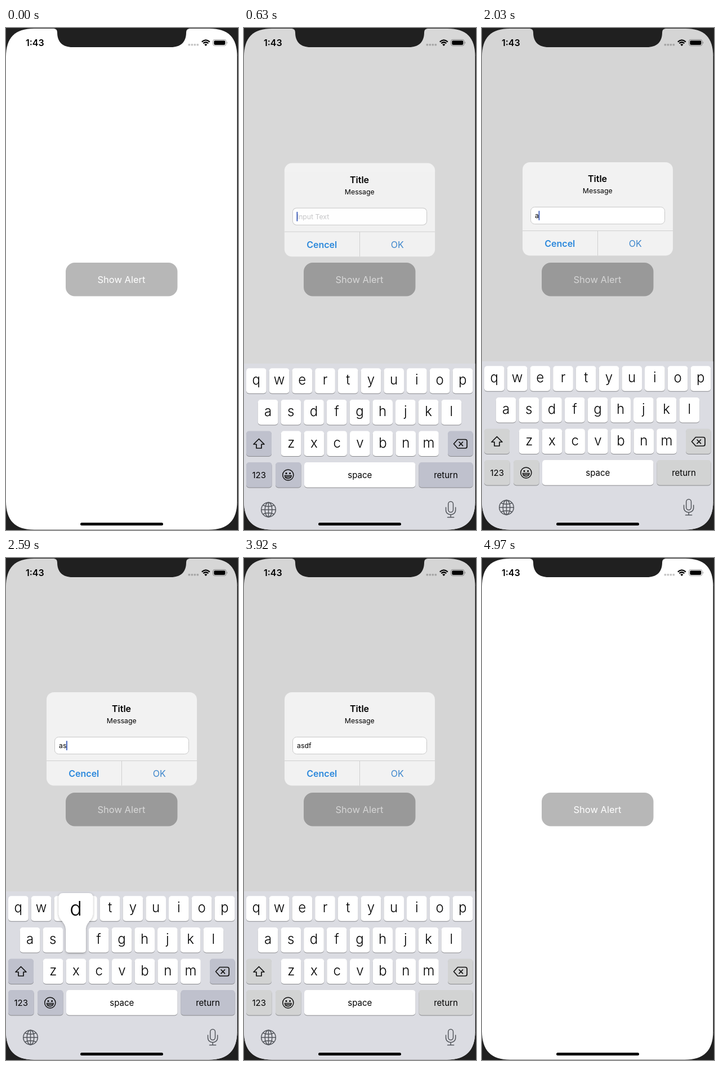
An HTML page that plays this animation: 412 px wide and 890 px high, repeating every 5.46 s.

```html
<!DOCTYPE html>
<html lang="en">
<head>
<meta charset="utf-8">
<title>Alert with text field</title>
<style>
  html, body { margin: 0; width: 100%; height: 100%; overflow: hidden; background: #202020; }
  svg { display: block; width: 412px; height: 890px; }
  text { font-family: Inter, Roboto, sans-serif; }
  .mid { text-anchor: middle; }
  .letter { font-size: 24px; font-weight: 300; }
  .word { font-size: 15px; }
  .bold { font-size: 16px; font-weight: 600; }
  .line { fill: none; stroke: #111; stroke-width: 1.7; stroke-linejoin: round; stroke-linecap: round; }
  .thin { fill: none; stroke: #53565c; stroke-width: 1.5; stroke-linecap: round; }
  #board { --dark: #bfc1cd; }
  #board.grey { --dark: #d2d3d3; }
  .dark { fill: var(--dark); }
</style>
</head>
<body>
<svg viewBox="0 0 412 890">
  <defs>
    <clipPath id="screen">
      <path d="M0 51C0 17 16 1 50 1H361C395 1 410.500 17 410.500 51V839C410.500 873 394 889.500 360 889.500H50C16 889.500 0 873 0 839Z"/>
    </clipPath>
    <filter id="soft" x="-30%" y="-20%" width="160%" height="140%">
      <feDropShadow dx="0" dy="1" stdDeviation="2" flood-opacity=".3"/>
    </filter>
  </defs>
  <rect width="412" height="890" fill="#202020"/>
  <rect x="410.500" y="50" width="1.500" height="790" fill="#080808"/>
  <g clip-path="url(#screen)">
    <rect width="412" height="890" fill="#fff"/>
    <rect x="106" y="416" width="198.500" height="59.500" rx="16" fill="#b7b7b7"/>
    <text class="mid" x="205" y="452" font-size="16.500" fill="#fff">Show Alert</text>
    <rect id="dim" width="412" height="890"/>

    <g id="alert">
      <rect x="72" y="238" width="267" height="165.500" rx="13" fill="#f2f2f2"/>
      <path id="press" d="M206 360H339V390.500A13 13 0 0 1 326 403.500H206Z" fill="#e2e2e2"/>
      <text class="mid bold" x="205" y="273">Title</text>
      <text class="mid" x="205.300" y="293" font-size="12.300">Message</text>
      <rect id="field" x="86.500" y="317.500" width="238" height="30" rx="7" stroke="#c8c8c8"/>
      <text id="hint" x="94" y="337" font-size="12.200" fill="#c6c6c8">Input Text</text>
      <text id="typed" x="94" y="337" font-size="12.300"></text>
      <rect id="caret" y="324" width="2" height="17" rx="1" fill="#4a68c0"/>
      <path d="M72 359.500H339M205.500 360V403.500" stroke="#d0d0d0"/>
      <text class="mid bold" x="138.300" y="388" fill="#2b88dc">Cencel</text>
      <text class="mid" x="272.300" y="388" font-size="16" fill="#3d86cc">OK</text>
    </g>

    <g id="board">
      <rect y="591" width="412" height="300" fill="#dbdce2"/>
      <g id="keys"></g>
      <path class="line" d="M26.500 724.500L36 734H31V741H22V734H17Z"/>
      <path class="line" d="M379.500 725.500H393Q396 725.500 396 728.500V738Q396 741 393 741H379.500L372.500 733.200ZM382 730L388.500 736.600M388.500 730L382 736.600"/>
      <circle class="line" cx="78.300" cy="788.500" r="9.600" style="stroke-width:1.500"/>
      <circle cx="75" cy="785.500" r="1.500"/><circle cx="81.600" cy="785.500" r="1.500"/>
      <path class="line" d="M72.300 789.500H84.300C83.500 796.500 73 796.500 72.300 789.500ZM74 792H82.600" style="stroke-width:1.300"/>
      <g class="thin">
        <circle cx="43.500" cy="850" r="12.800"/>
        <ellipse cx="43.500" cy="850" rx="6.300" ry="12.800"/>
        <path d="M43.500 837V863M30.700 850H56.300M33.500 842Q43.500 846.500 53.500 842M33.500 858Q43.500 853.500 53.500 858"/>
        <rect x="362.700" y="835.500" width="8.800" height="19" rx="4.400"/>
        <path d="M358.500 846V850.500C358.500 861.500 375.700 861.500 375.700 850.500V846M367.100 859V863.500M361.500 863.500H372.700"/>
      </g>
      <g id="popup">
        <path filter="url(#soft)" fill="#fff" d="M-22.500 -61H22.500Q30.500 -61 30.500 -53V-26C30.500 -12 17.800 -10 17.800 4V39.500Q17.800 44.500 12.800 44.500H-12.800Q-17.800 44.500 -17.800 39.500V4C-17.800 -10 -30.500 -12 -30.500 -26V-53Q-30.500 -61 -22.500 -61Z"/>
        <text id="big" class="mid" y="-21" font-size="36" font-weight="300"></text>
      </g>
    </g>
    <rect x="132" y="877" width="147" height="5" rx="2.500"/>
  </g>

  <path fill="#202020" d="M85 0V1Q91 1.500 91 8C91 25 101 34 118 34H293C310 34 320 25 320 8Q320 1.500 326 1V0Z"/>
  <text class="bold" x="35" y="32">1:43</text>
  <g opacity=".22">
    <rect x="323.500" y="28" width="3.600" height="3.600" rx="1"/>
    <rect x="328.500" y="28" width="3.600" height="3.600" rx="1"/>
    <rect x="333.500" y="28" width="3.600" height="3.600" rx="1"/>
    <rect x="338.500" y="28" width="3.600" height="3.600" rx="1"/>
  </g>
  <path d="M347.800 24.600Q354.800 18 361.800 24.600M350.300 27.300Q354.800 23.200 359.300 27.300" fill="none" stroke="#000" stroke-width="2.200"/>
  <path d="M352.200 29.200Q354.800 27.200 357.400 29.200L354.800 32Z"/>
  <rect x="367.500" y="20.500" width="23.500" height="11" rx="3.300" fill="none" stroke="#000" stroke-opacity=".38"/>
  <rect x="369.300" y="22.200" width="20" height="7.700" rx="1.800"/>
  <path d="M392.200 24Q394.200 26 392.200 28Z" opacity=".45"/>
</svg>
<script>
  const LOOP = 5460, STEP = 70, SHOW = 330, HIDE = 4376;
  const PITCH = 40.72, KEY_W = 35.7, KEY_H = 44.500;
  const el = id => document.getElementById(id);
  const set = (id, attrs) => { for (const k in attrs) el(id).setAttribute(k, attrs[k]); };
  const within = (t, [a, b]) => t >= a && t < b;

  // Keyboard
  const centers = {};
  let markup = "";
  function key(x, y, w, label, type, dark) {
    const box = `x="${x}" width="${w}" height="${KEY_H}" rx="5"`;
    markup += `<rect ${box} y="${y + 1}" fill="#898a8e"/>` +
      `<rect ${box} y="${y}" ${dark ? 'class="dark"' : 'fill="#fff"'}/>` +
      `<text class="mid ${type}" x="${x + w / 2}" y="${y + (type === "word" ? 27.500 : 29)}">${label}</text>`;
  }
  [["qwertyuiop", 4, 599.300], ["asdfghjkl", 24.700, 655], ["zxcvbnm", 65.800, 710.500]].forEach(([row, x0, y]) =>
    [...row].forEach((c, i) => {
      const x = x0 + i * PITCH;
      centers[c] = x + KEY_W / 2;
      key(x, y, KEY_W, c, "letter");
    }));
  key(4, 710.500, 45, "", "word", true);
  key(362, 710.500, 44.500, "", "word", true);
  key(4, 766, 45.500, "123", "word", true);
  key(56, 766, 45.500, "", "word", true);
  key(107, 766, 197.500, "space", "word");
  key(310.500, 766, 96, "return", "word", true);
  el("keys").innerHTML = markup;

  // Each key: letter, pressed at, released at
  const taps = [["a", 1680, 1890], ["s", 2170, 2380], ["d", 2520, 2730], ["f", 3010, 3220]];
  const idle = [[840, 1680], [2030, 2170], [2870, 3010], [3500, 4060]];

  // Remaining distance of a critically damped spring
  function rest(t, start, speed) {
    const x = Math.max(0, t - start) * speed / 1000;
    return (1 + x) * Math.exp(-x);
  }
  const ramp = (t, a, b) => Math.min(1, Math.max(0, (t - a) / (b - a)));

  function caretAlpha(t) {
    if (t < 1500) return 1 - ramp(t, 840, 1050) + ramp(t, 1190, 1400);
    return 1 - ramp(t, 3640, 3920);
  }

  function draw(t) {
    const leaving = t >= HIDE;
    const slide = leaving ? 1 - rest(t, HIDE, 21) : rest(t, SHOW, 21);
    const fade = leaving ? rest(t, HIDE, 25) : 1 - rest(t, SHOW, 25);
    const grey = idle.some(span => within(t, span));

    set("dim", { opacity: fade * (grey ? 0.163 : 0.155) });
    set("board", { transform: `translate(0 ${299 * slide})`, class: grey ? "grey" : "" });

    const lift = leaving ? 0 : 124 * slide;
    const scale = leaving ? 1 : 1.2 - 0.2 * fade;
    set("alert", {
      opacity: fade,
      transform: `translate(205.500 ${320.750 + lift}) scale(${scale}) translate(-205.500 -320.750)`
    });
    set("field", { fill: leaving ? "#dcdcdc" : "#fff", "stroke-opacity": leaving ? 0 : 1 });
    set("press", { opacity: within(t, [4130, 4340]) ? 1 : 0 });

    const text = taps.filter(k => t >= k[2]).map(k => k[0]).join("");
    el("typed").textContent = text;
    set("hint", { opacity: text ? 0 : 1 });
    const end = text ? el("typed").getComputedTextLength() : 0;
    set("caret", { x: 93.500 + end, opacity: caretAlpha(t) });

    const tap = taps.find(k => within(t, [k[1], k[2]]));
    set("popup", { visibility: tap ? "visible" : "hidden" });
    if (tap) {
      el("big").textContent = tap[0];
      set("popup", { transform: `translate(${centers[tap[0]]} 655)` });
    }
  }

  const begin = performance.now();
  function tick() {
    const t = (performance.now() - begin) % LOOP;
    draw(Math.floor(t / STEP) * STEP);
    requestAnimationFrame(tick);
  }
  tick();
</script>
</body>
</html>
```
